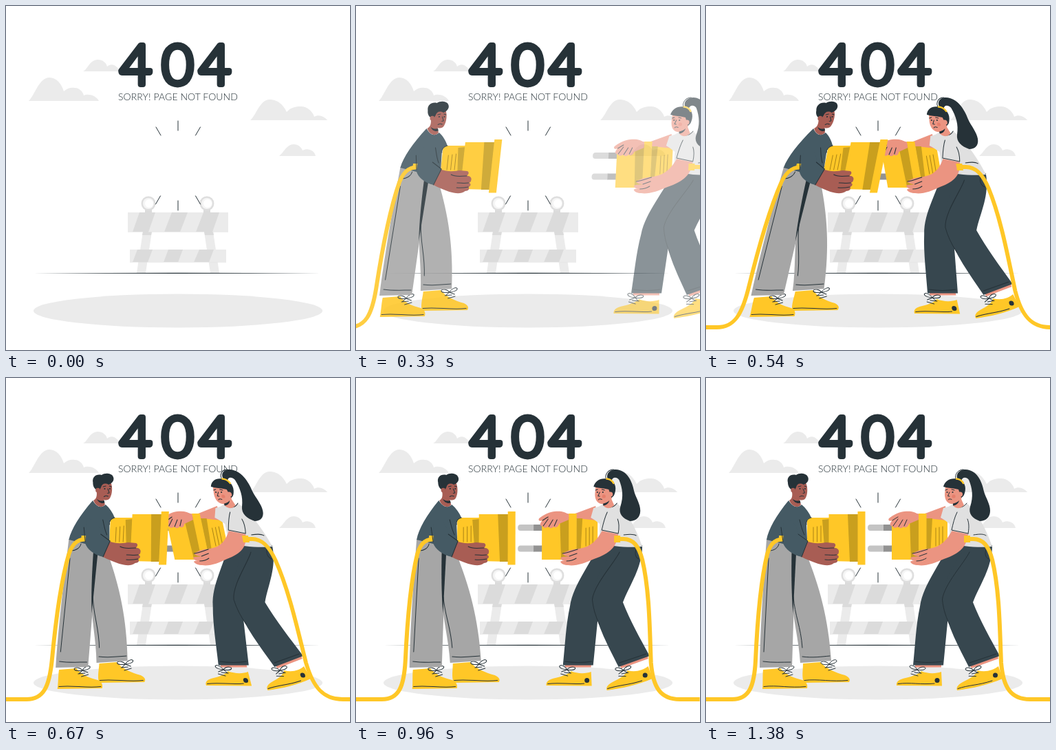
An HTML page for the animation above (1.43 s loop, 500 by 500 pixels).

```html
<!DOCTYPE html>
<html lang="en">
<head>
<meta charset="utf-8">
<title>404</title>
<style>
html, body { margin: 0; height: 100%; overflow: hidden; background: #fff }
svg { display: block; width: 100%; height: 100% }
.ink { fill: none; stroke: #263238; stroke-width: 1; stroke-linecap: round; stroke-linejoin: round }
.groove { stroke: #a88316 }
.cable { fill: none; stroke: #ffc727; stroke-width: 6 }
.dark { fill: #263238 }
.pale { fill: #ebebeb }
.band { fill: #dbdbdb }
.gold { fill: #ffc727 }
.ochre { fill: #c99f1e }
.brown { fill: #a85d54 }
.pink { fill: #eb9481 }
.slate { fill: #455a64 }
.navy { fill: #37474f }
.grey { fill: #a6a6a6 }
.shirt { fill: #e0e0e0 }
.title { font: 300 80px Lato, sans-serif; fill: #263238; stroke: #263238; stroke-width: 8; stroke-linejoin: round }
.note { font: 300 14px Lato, sans-serif; fill: #263238; text-anchor: middle; letter-spacing: .07px }
</style>
</head>
<body>
<svg viewBox="0 0 500 500">
  <defs>
    <path id="lace" class="ink" d="M0 0C-4-5-12-5-12-2C-11 1-4 1 0 0C3-6 10-8 11-5C11-2 4 0 0 0M0 0L-5 5M0 0L8 3M-6 5L4 4M-1 9L9 6"/>
    <g id="lamp">
      <path class="band" d="M-5 9H5V14H-5Z"/>
      <circle r="10.5" fill="#dedede"/><circle r="8" fill="#f5f5f5"/><circle r="6" cx="1" fill="#fff"/>
    </g>
  </defs>

  <g class="pale">
    <path d="M33 138C41 131 48 104 63 104C74 104 81 114 84 124C89 119 95 118 100 119C107 119 112 125 113 130C119 127 131 130 135 138Z"/>
    <path d="M112 95C118 93 122 78 133 78C141 78 146 83 147 88C153 82 162 86 165 95Z"/>
    <path d="M355 166C363 160 369 136 383 136C397 136 404 146 408 154C414 147 422 146 428 146C439 146 446 154 448 161C455 157 463 161 467 166Z"/>
    <path d="M397 218C403 214 408 201 418 201C425 201 430 206 431 210C438 206 448 209 450 218Z"/>
    <ellipse cx="250" cy="443" rx="210" ry="24.5"/>
  </g>

  <text class="title" x="165.500 226.300 280.500" y="114">404</text>
  <text class="note" x="250" y="137">SORRY! PAGE NOT FOUND</text>

  <path class="pale" d="M199 328H212L203 388H190ZM288 328H301L310 388H297Z"/>
  <path class="band" d="M199 328H212L211 333H198ZM288 328H301L302 333H289Z"/>
  <path class="band" d="M177 300H323V328.500H177ZM180 354H320V372.500H180Z"/>
  <path class="pale" d="M177 300H194L184 328.500H177ZM217 300H241L230 328.500H207ZM264 300H287L276 328.500H253ZM310 300H323V328.500H300Z"/>
  <path class="pale" d="M180 354H191L184 372.500H180ZM213 354H236L229 372.500H206ZM257 354H281L273 372.500H250ZM302 354H320V372.500H295Z"/>
  <use href="#lamp" x="207" y="287"/><use href="#lamp" x="292" y="287"/>

  <path class="dark" d="M40 388.300Q250 387 457 388.300Q250 389.600 40 388.300Z"/>
  <path class="ink" d="M250 167V181M218 176L225 188M282.500 176L275.500 188M224.500 276L217.500 288M275.500 276L282.500 288M250 283V297"/>

  <g id="woman">
    <path fill="#c4c4c4" d="M239 213H259V222H239Q235 222 235 217.500T239 213ZM239 243.500H259V252.500H239Q235 252.500 235 248T239 243.500Z"/>
    <path fill="#929292" d="M258 213H271V222H258ZM258 243.500H271V252.500H258Z"/>

    <path class="pink" d="M304 416H342V420.500H304ZM383 417L424 403L425 408L386 422Z"/>
    <path class="gold" d="M277 447C276 441 281 438 290 436C302 433 308 431 313 426C322 430 334 430 342 427L343 447.500Z"/>
    <path class="gold" d="M365 454C363 449 367 445 375 441C386 436 392 431 395 425C406 428 417 425 425 419L431 437C410 446 388 451 365 454Z"/>
    <path class="ink" d="M279 444.500C297 442 312 446 332 444M366 451.500C382 446 395 447 416 440"/>
    <circle class="dark" cx="336" cy="439.500" r="3.500"/><circle class="dark" cx="420.500" cy="432" r="3.500"/>
    <use href="#lace" transform="translate(307 424) scale(-1 1)"/>
    <use href="#lace" transform="translate(389 425) rotate(-16) scale(-1 1)"/>

    <path class="navy" d="M353 238C343 270 316 298 311 332C305 360 304 390 301 417.500H345L352 345L372 300L402 250Z"/>
    <path class="navy" d="M356 239L416 243C416 276 398 300 388 326C398 352 414 380 427 404L382 420C367 390 351 362 344 325C342 300 360 270 372 255Z"/>
    <path class="ink" d="M383 253C376 268 346 300 343.500 322C345 338 350 350 354 358M304 412C317 414 330 414 343 412M383 414L422 401M407 249C404 258 408 262 411 263"/>

    <path class="gold" d="M320 204H347Q351 205 351 210V252H320Z"/>
    <path class="ink groove" d="M334 218V244M339 217V243M344 216V242"/>
    <path class="pink" d="M348 186L321 196C314 199 310 198 303 196L302 210L322 204L350 207Z"/>
    <path class="gold" d="M270 203L310 202V264H270ZM309 197H320.500V262H309Z"/>
    <path class="ochre" d="M296 203L309 202V263H298ZM320.500 204H329L326 260H320.500Z"/>
    <path class="pink" d="M309 199C304 194 297 193 288 194C280 195 272 199 266 204C264 207 267 209 271 207C266 211 267 216 271 215C273 219 277 218 279 216C282 220 286 218 287 216C290 219 294 216 295 212L309 206Z"/>
    <path class="ink" d="M271 207C274 205 277 203 279 202M272 215L279 205M280 216L286 206M288 215L292 206"/>

    <path class="shirt" d="M345 189C351 188 355 186 359 183C364 190 373 190 379 182C394 194 408 221 416 245C399 247 371 245 354 240L354 212C349 208 345 205 341 203Z"/>
    <path class="pink" d="M358 221L381 225C380 245 369 255 346 263C333 269 318 274 308 272C303 272 298 270 297 267C299 265 303 266 306 266C301 266 297 264 297 261C302 259 306 260 310 259C306 259 301 258 300 255C308 250 316 249 325 248C342 245 350 236 358 221Z"/>
    <path class="ink" d="M306 266C312 266 317 264 320 262M310 259L321 255M300 255C308 254 315 251 322 249"/>
    <path class="shirt" d="M363 193C374 192 385 199 384 211L381 227L356 222C357 211 359 202 363 193Z"/>
    <path class="ink" d="M365 195C361 203 359 212 357 221L381 226M380 205C383 212 382 220 381 226M359 183C364 190 373 190 379 182M389 228C396 227 403 226 407 229"/>
    <path class="cable" d="M376 234H387C403 233 411 245 416 264C427 310 427 368 429 414C432 450 443 467 471 467H500"/>
    <path class="gold" d="M375 229H384V239H375Z"/>

    <path class="dark" d="M366 148C362 140 368 133 377 133C394 134 401 150 404 165C407 175 413 183 413 193C413 203 406 208 398 208C387 204 381 197 384 187C389 172 387 160 382 148C378 143 372 144 371 150Z"/>
    <path class="ink" d="M363 147C361 139 367 133 374 133"/>
    <path class="pink" d="M348 157L366 159C371 163 374 171 371 176L375 185C369 191 362 190 359 185V183C352 184 347 178 347 169Z"/>
    <path class="dark" d="M359 182.500C363 182 366 180 368 178C367 182 364 185 359 185.500Z"/>
    <path class="dark" d="M345 158C347 149 356 144 367 147C375 149 379 158 376 167C375 171 373 173 371 174L367 162C359 160 351 160 345 158Z"/>
    <circle class="pink" cx="369.500" cy="169" r="3.500"/>
    <path class="ink" style="stroke:#ffc727;stroke-width:2.500" d="M364 146.500C369 147 372 149 374 153"/>
    <circle class="dark" cx="350.500" cy="166" r="1.100"/><circle class="dark" cx="358.500" cy="166" r="1.100"/>
    <path class="ink" d="M354 166L351.500 171.500L354 172M352 177C353 175.500 355 175.500 357 176.500M348 163L351 162M357 162L361 163"/>
    <circle cx="360" cy="172" r="2.600" fill="#e2705d" opacity=".6"/>
  </g>

  <g id="man">
    <g transform="translate(0 1)">
      <path class="gold" d="M83 423L108 421C117 431 128 435 140 438C147 441 148 446 147 450L82 451C83 443 82 432 83 423Z"/>
      <path class="gold" d="M141 414L166 412C176 422 187 427 202 431C209 434 210 438 208 441L142 442C139 432 141 424 141 414Z"/>
      <path class="ink" d="M84 447.500C104 445 122 450 145 447.500M143 438.500C163 436 183 441 206 438.500"/>
      <use href="#lace" transform="translate(117 424)"/>
      <use href="#lace" transform="translate(179 415)"/>
    </g>

    <path class="grey" d="M124 240L146 256C165 303 178 350 182 411L137 414C135 380 126 350 125 320Z"/>
    <path class="grey" d="M88 234L142 240L130 257L125 420L78 421C79 360 84 290 88 234Z"/>
    <path class="dark" d="M124.500 254L131 255L126.500 342C124 312 124 282 124.500 254Z"/>
    <path class="ink" d="M83 412C97 414 110 413 123 413M140 405C155 407 168 405 180 404M91 262L84 398M106 241C105 247 99 251 92 251M127 318C129 345 138 362 140 392M132 243L131 256"/>

    <path class="gold" d="M152 203H181V260H147V208Q147 204 152 203Z"/>
    <path class="ochre" d="M169 206L179 205V258H173Z"/>
    <path class="ink groove" d="M156 217V238M161.500 216V238M167 215V238"/>
    <path class="gold" d="M178.500 198H222V267L178.500 266Z"/>
    <path class="ochre" d="M206 198H221V267H209Z"/>
    <path class="gold" d="M220.500 194H231.500V271.500H220.500Z"/>

    <path class="slate" d="M120 178C127 189 134 189 139 184C145 189 150 196 153 203C147 204 146 208 146 213L147 235L132 246L88 235C91 219 102 200 120 178Z"/>
    <path class="cable" d="M0 467H38C63 467 70 448 72 411C75 344 80 293 89 256C94 239 101 233 122 233"/>
    <path class="gold" d="M106 229H116V237.500H106Z"/>
    <path class="brown" d="M143 236C157 242 168 240 175 239L186 240C190 242 188 246 185 247C190 246 194 250 193 253C193 256 191 257 189 257C194 257 194 262 190 263C193 266 190 269 186 269C180 274 171 272 163 270C155 267 146 264 137 259Z"/>
    <path class="ink" d="M163 245C170 249 178 247 186 247M173 257C179 257 184 258 190 257M173 264C179 265 185 264 190 263"/>
    <path class="slate" d="M113 205C122 203 131 212 134 225L148 237L139 260C126 257 115 249 112 240Z"/>
    <path class="ink" d="M134 227L148 237L139 260M136 206C138 213 139 220 143 228M109 217L112 238M146 213C145 208 148 204 153 203"/>

    <path class="brown" d="M124 152H145C148 158 148 168 145 174C143 178 139 178 136 177L138 184C134 190 125 187 121 178C125 176 126 171 125 166Z"/>
    <path class="dark" d="M126 176C130 179 133 179 136.500 178L137.500 181.500C133 183 128 181 126 176Z"/>
    <path class="dark" d="M119 152C117 144 123 139 131 141C136 137 145 139 147 142C151 147 148 153 142 155C136 152 132 154 131 159L128 165C121 161 119 157 119 152Z"/>
    <circle class="brown" cx="126.500" cy="163" r="3.200"/>
    <circle class="dark" cx="136.500" cy="161" r="1.100"/><circle class="dark" cx="144" cy="161" r="1.100"/>
    <path class="ink" d="M141 161L143.500 167L141 167.500M136 172.500C138 171 140 171 142 172M134 158L138 157M143 157L146 158"/>
  </g>
</svg>
<script>
const LOOP = 1430, LEAD = 15, PIVOT_Y = 303;
// time, shift, slant, opacity
const KEYS = [[0, -250, .364, 0], [.6, 0, -.176, 1], [.8, 0, .035, 1], [1, 0, 0, 1]];
const man = document.getElementById('man'), woman = document.getElementById('woman');

const cubic = (a, b, u) => 3 * (1 - u) ** 2 * u * a + 3 * (1 - u) * u * u * b + u ** 3;

// cubic-bezier(.36, -.01, .5, 1.38)
function ease(x) {
  let lo = 0, hi = 1;
  for (let i = 0; i < 24; i++) {
    const mid = (lo + hi) / 2;
    if (cubic(.36, .5, mid) < x) lo = mid; else hi = mid;
  }
  return cubic(-.01, 1.38, lo);
}

function rushIn(node, time, duration, side) {
  const p = Math.min((time + LEAD) / duration, 1);
  const i = Math.max(1, KEYS.findIndex(key => p <= key[0]));
  const from = KEYS[i - 1], to = KEYS[i];
  const e = ease((p - from[0]) / (to[0] - from[0]));
  const [, shift, slant, opacity] = from.map((v, n) => v + (to[n] - v) * e);
  const k = slant * side;
  node.setAttribute('transform', `matrix(1 0 ${k} 1 ${shift * side - k * PIVOT_Y} 0)`);
  node.setAttribute('opacity', Math.min(1, Math.max(0, opacity)));
}

function draw() {
  const time = performance.now() % LOOP;
  rushIn(man, time, 1000, 1);
  rushIn(woman, time, 1372, -1);
  requestAnimationFrame(draw);
}
draw();
</script>
</body>
</html>
```
